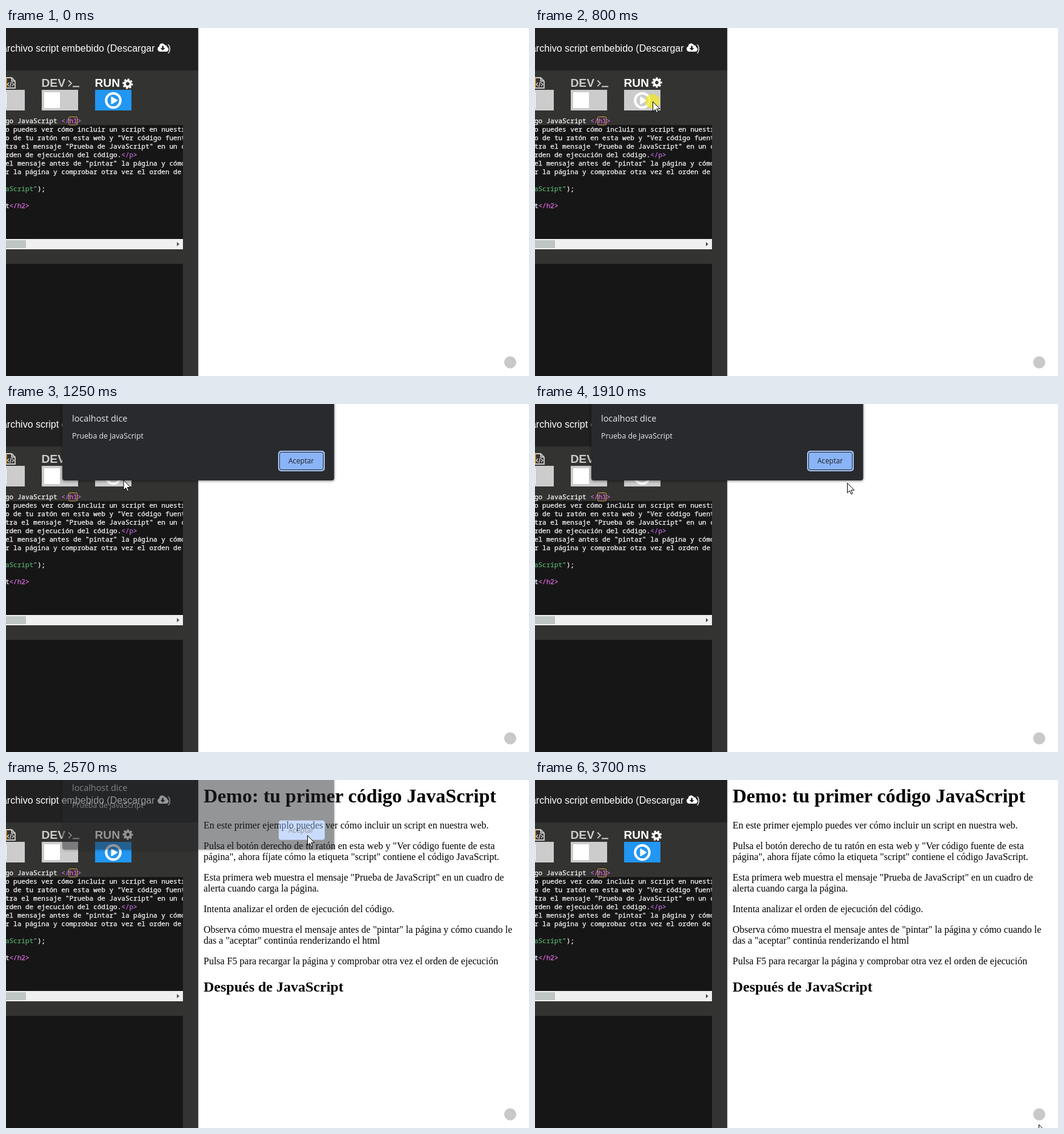
An HTML page for the animation above (3770 ms loop, 863x574 px).

```html
<!DOCTYPE html>
<html lang="es">
<head>
<meta charset="utf-8">
<title>Demo JavaScript</title>
<style>
  html, body { margin: 0; width: 100%; height: 100%; overflow: hidden; background: #fff; }
  svg { display: block; }
  text { white-space: pre; }
  .ui { font: 16px "Liberation Sans", Arial, sans-serif; fill: #fff; }
  .label { font: bold 19.2px "Liberation Sans", Arial, sans-serif; fill: #ccc; }
  .code { font: 11px "Noto Sans Mono", monospace; fill: #f8f8f8; stroke: #f8f8f8; stroke-width: .25px; }
  .code .tag { fill: #b968d2; stroke: #b968d2; }
  .code .name { fill: #dd68e0; stroke: #dd68e0; }
  .code .str { fill: #56a86b; stroke: #56a86b; }
  .page { font: 16px "Liberation Serif", "Times New Roman", serif; fill: #000; }
  .box { font: 12.3px "Open Sans", "Noto Sans", sans-serif; fill: #e8eaed; }
</style>
</head>
<body>
<svg width="863" height="574" viewBox="0 0 863 574">
  <defs>
    <clipPath id="codeClip"><rect y="140" width="292" height="208"/></clipPath>
    <filter id="shadow" x="-5%" y="-10%" width="110%" height="125%" color-interpolation-filters="sRGB">
      <feDropShadow dx="0" dy="1" stdDeviation="2" flood-opacity=".5"/>
    </filter>
  </defs>

  <rect width="318" height="574" fill="#333331"/>
  <rect width="318" height="70" fill="#212121"/>

  <text class="ui" x="245.5" y="39" text-anchor="end">archivo script embebido (Descargar</text>
  <path d="M254.5 39a4.6 4.6 0 0 1-1.6-8.8 4.9 4.9 0 0 1 9.3-2 3.2 3.2 0 0 1 3.6 3.3 3.9 3.9 0 0 1-1.2 7.5z" fill="#fff"/>
  <path d="M257.4 29.5h2.6v3.4h2.6l-3.9 4.1-3.9-4.1h2.6z" fill="#212121"/>
  <text class="ui" x="266.8" y="39">)</text>

  <g fill="none" stroke="#ccc" stroke-width="1.8">
    <path d="M0 82H9.5L15 87.5V99H0M9.5 82v5.5H15"/>
    <path d="M5 90l-3 3 3 3M10 90l3 3-3 3M8.6 89l-2 8" stroke-width="1.4"/>
    <path d="M103 86.5l5 4.8-5 4.8M110 96.5h11"/>
  </g>
  <rect y="82" width="1.4" height="17" fill="#e8a33d"/>

  <rect x="-29" y="102" width="60" height="34" fill="#ccc"/>
  <rect y="106" width="1" height="26" fill="#fff"/>
  <text class="label" x="58.5" y="97">DEV</text>
  <rect x="59" y="102" width="60" height="34" fill="#ccc"/>
  <rect x="63" y="106" width="26" height="26" fill="#fff"/>
  <text class="label" x="146.5" y="97" style="fill:#fff">RUN</text>
  <rect id="run" x="147" y="102" width="60" height="34"/>
  <circle cx="177" cy="119.5" r="11.8" fill="none" stroke="#fff" stroke-width="4"/>
  <path d="M174.2 114v11l9.2-5.5z" fill="#fff" stroke="#fff" stroke-width="1.6" stroke-linejoin="round"/>
  <g id="gear" fill="none" stroke="#fff">
    <circle cy="-1" r="4.7" stroke-width="3.6"/>
    <circle cy="-1" r="7.2" stroke-width="2.8" pathLength="128" stroke-dasharray="9 7" stroke-dashoffset="4.5"/>
  </g>

  <rect y="160" width="292" height="188" fill="#161616"/>
  <g class="code" clip-path="url(#codeClip)">
    <text x="-1.1" y="157">go JavaScript <tspan class="tag">&lt;/</tspan><tspan class="name">h1</tspan><tspan class="tag">&gt;</tspan></text>
    <text x="-1.1" y="171">o puedes ver cómo incluir un script en nuestra</text>
    <text x="-1.1" y="185">o de tu ratón en esta web y "Ver código fuente</text>
    <text x="-1.1" y="199">tra el mensaje "Prueba de JavaScript" en un cu</text>
    <text x="-1.1" y="213">rden de ejecución del código.<tspan class="tag">&lt;/p&gt;</tspan></text>
    <text x="-1.1" y="227">el mensaje antes de "pintar" la página y cómo </text>
    <text x="-1.1" y="241">r la página y comprobar otra vez el orden de e</text>
    <text x="-1.1" y="269"><tspan class="str">aScript"</tspan>);</text>
    <text x="-1.1" y="297">t<tspan class="name">&lt;/h2&gt;</tspan></text>
    <rect x="103.5" y="146.5" width="14" height="13.5" rx="2" fill="none" style="stroke:#e0a050;stroke-width:1px"/>
  </g>
  <rect y="348" width="292" height="17" fill="#f0f0f0"/>
  <rect y="350" width="33" height="13" fill="#bfc5c3"/>
  <path d="M282 353v7l4-3.5z" fill="#505050"/>
  <rect y="389" width="292" height="185" fill="#161616"/>

  <rect x="317.3" width="545.7" height="574" fill="#fff"/>
  <g id="page" class="page">
    <text x="326" y="37" style="font-size:32px;font-weight:bold">Demo: tu primer código JavaScript</text>
    <text x="326" y="80">En este primer ejemplo puedes ver cómo incluir un script en nuestra web.</text>
    <text x="326" y="114">Pulsa el botón derecho de tu ratón en esta web y "Ver código fuente de esta</text>
    <text x="326" y="132">página", ahora fíjate cómo la etiqueta "script" contiene el código JavaScript.</text>
    <text x="326" y="166">Esta primera web muestra el mensaje "Prueba de JavaScript" en un cuadro de</text>
    <text x="326" y="184">alerta cuando carga la página.</text>
    <text x="326" y="218">Intenta analizar el orden de ejecución del código.</text>
    <text x="326" y="252">Observa cómo muestra el mensaje antes de "pintar" la página y cómo cuando le</text>
    <text x="326" y="270">das a "aceptar" continúa renderizando el html</text>
    <text x="326" y="304">Pulsa F5 para recargar la página y comprobar otra vez el orden de ejecución</text>
    <text x="326" y="349" style="font-size:24px;font-weight:bold">Después de JavaScript</text>
  </g>
  <circle cx="832" cy="551.5" r="10" fill="#c9c9c9"/>

  <g id="dialog" class="box">
    <rect x="93" y="-30" width="448.5" height="156" rx="4" fill="#292a2d" filter="url(#shadow)"/>
    <text x="109" y="29" style="font-size:14.4px">localhost dice</text>
    <text x="109" y="57">Prueba de JavaScript</text>
    <rect id="accept" x="450" y="78" width="76" height="32" rx="4"/>
    <g id="focus" fill="none">
      <rect x="450" y="78" width="75" height="32" rx="4" stroke="#a8c7fa" stroke-width="2"/>
      <rect x="451.5" y="79.5" width="72" height="29" rx="3" stroke="#202124"/>
    </g>
    <text x="487" y="98" text-anchor="middle" style="font-size:11.7px;fill:#202124">Aceptar</text>
  </g>

  <g id="cursor">
    <circle id="press" r="12" fill="#f5ea14" fill-opacity=".68"/>
    <path d="M.5.5V16.8L4.3 13.2 6.8 18.9 9.1 17.9 6.7 12.3H11.8Z" fill="#fff" stroke="#000"/>
  </g>
</svg>
<script>
  const LOOP = 3770, SPIN = 360 / 2000;
  const $ = id => document.getElementById(id);
  const [run, gear, page, dialog, accept, focusRing, cursor, press] =
    ['run', 'gear', 'page', 'dialog', 'accept', 'focus', 'cursor', 'press'].map($);

  // time, x, y
  const path = [
    [70, 232, 267], [460, 199, 128], [530, 194, 121], [1000, 194, 121], [1200, 193, 125],
    [1250, 193, 125], [1550, 360, 166], [1720, 447, 161], [1910, 515, 130], [2200, 497, 91],
    [3150, 497, 91], [3370, 530, 263], [3700, 831, 568]
  ];

  const within = (t, a, b) => t >= a && t < b;
  const ramp = (t, a, b) => Math.min(1, Math.max(0, (t - a) / (b - a)));
  const show = (el, on) => el.setAttribute('visibility', on ? 'visible' : 'hidden');

  function pointAt(t) {
    const i = path.findIndex(p => p[0] > t);
    if (i < 0) return path[path.length - 1].slice(1);
    if (i === 0) return path[0].slice(1);
    const a = path[i - 1], b = path[i], k = ramp(t, a[0], b[0]);
    return [a[1] + (b[1] - a[1]) * k, a[2] + (b[2] - a[2]) * k];
  }

  function gearAngle(t) {
    if (t < 440) return 190 + t * SPIN;
    return Math.max(0, t - 2560) * SPIN;
  }

  function draw(t) {
    const [x, y] = pointAt(t);
    cursor.setAttribute('transform', `translate(${x} ${y})`);
    cursor.style.display = t < 70 ? 'none' : '';
    show(press, within(t, 720, 930) || within(t, 2370, 2490));

    run.setAttribute('fill', within(t, 440, 2510) ? '#ccc' : '#2196f3');
    gear.setAttribute('transform', `translate(201 91) rotate(${gearAngle(t)})`);
    show(page, t >= 2510);

    const open = ramp(t, 940, 1120) - ramp(t, 2490, 2650);
    dialog.setAttribute('opacity', open);
    dialog.setAttribute('transform', `translate(0 ${-22 * (1 - open)})`);
    accept.setAttribute('fill', t >= 2120 ? '#93baf9' : '#8ab4f8');
    show(focusRing, t < 2370);
  }

  const start = performance.now();
  (function tick() {
    draw((performance.now() - start) % LOOP);
    requestAnimationFrame(tick);
  })();
</script>
</body>
</html>
```
